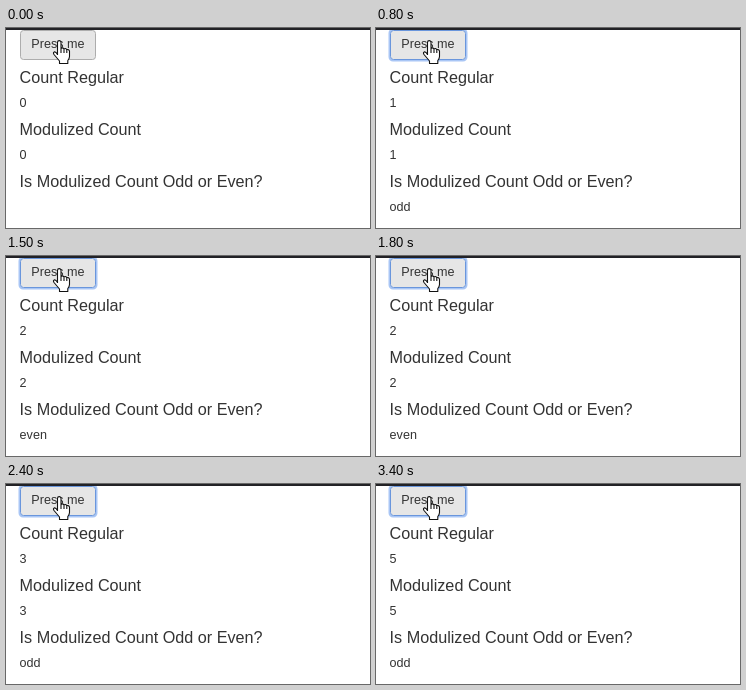
These frames come from a looping animation (364 by 200 pixels, 3.5 s). An HTML page:

```html
<!DOCTYPE html>
<html lang="en">
<head>
<meta charset="utf-8">
<title>Counter</title>
<style>
  html, body { margin: 0; width: 100%; height: 100%; overflow: hidden; background: #fff; }
  svg { display: block; width: 364px; height: 200px; }
  text { font: 12.6px "Liberation Sans", Arial, sans-serif; fill: #333; }
  .heading { font-size: 16.2px; }
  .focus { fill: none; display: none; }
  .hover { fill: #e6e6e6; stroke: #adadad; }
  .focused .focus { display: inline; }
  .focused .hover { stroke: #6a96dc; }
  .pressed .hover { fill: #d4d4d4; }
  .inset { fill: url(#shade); display: none; }
  .pressed .inset { display: inline; }
</style>
</head>
<body>
<svg viewBox="0 0 364 200">
  <defs>
    <linearGradient id="shade" x2="0" y2="1">
      <stop offset="0" stop-opacity=".12"/>
      <stop offset="1" stop-opacity="0"/>
    </linearGradient>
  </defs>
  <g id="button">
    <rect class="focus" x="13.5" y="1.5" width="77" height="31" rx="3.5" stroke="#a9c6f5" stroke-width="2"/>
    <rect class="hover" x="14.5" y="2.5" width="75" height="29" rx="3"/>
    <rect class="inset" x="15" y="3" width="74" height="5"/>
    <text x="25.3" y="20">Press me</text>
  </g>
  <rect width="364" height="2" fill="#222226"/>
  <text class="heading" x="13.6" y="55">Count Regular</text>
  <text id="regular" x="13.6" y="79"></text>
  <text class="heading" x="13.6" y="107">Modulized Count</text>
  <text id="modulized" x="13.6" y="131"></text>
  <text class="heading" x="13.6" y="159">Is Modulized Count Odd or Even?</text>
  <text id="parity" x="13.6" y="183"></text>
  <path fill="#fff" stroke="#111" stroke-width="1.1" stroke-linejoin="round"
    d="M51.5 27V14.4a1.75 1.75 0 0 1 3.5 0V20.5q1.5-1.3 3 .4 1.6-1 2.8.7 2.2-.6 2.7 1.6V28.500q0 2-1.700 4V35.500H53.500V33L48 26.500q-1.200-2 .3-2.600 1.500-.4 3.200 2.600M55 20.500V25M58 21V25M60.800 21.800V25"/>
</svg>
<script>
  const LOOP = 3500, HOLD = 200, REPLY = 300;
  const presses = [500, 1100, 1600, 2200, 2700];
  const byId = id => document.getElementById(id);
  const [button, regular, modulized, parity] =
    ["button", "regular", "modulized", "parity"].map(byId);

  function draw() {
    const t = performance.now() % LOOP;
    const count = presses.filter(p => t >= p + REPLY).length;
    button.classList.toggle("focused", t >= presses[0]);
    button.classList.toggle("pressed", presses.some(p => t >= p && t < p + HOLD));
    regular.textContent = modulized.textContent = count;
    parity.textContent = count ? (count % 2 ? "odd" : "even") : "";
    requestAnimationFrame(draw);
  }
  draw();
</script>
</body>
</html>
```
